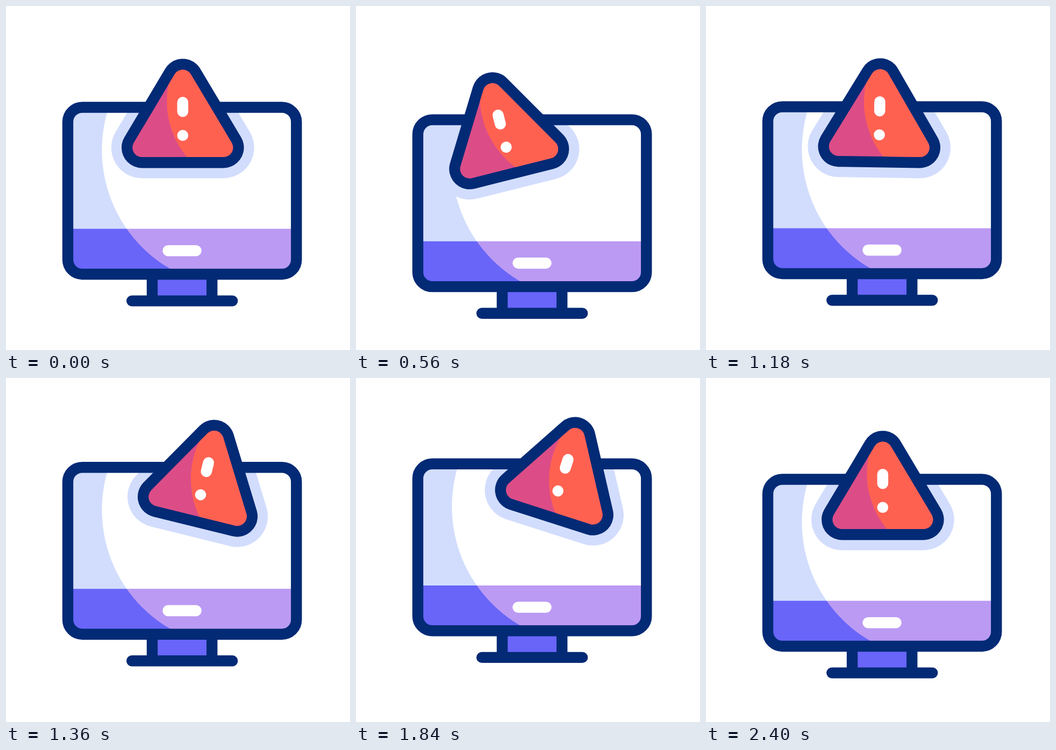
An HTML page for the animation above (2.42 s loop, 640 by 640 pixels).

```html
<!DOCTYPE html>
<html lang="en">
<head>
<meta charset="utf-8">
<title>Monitor warning</title>
<style>
  html, body { margin: 0; width: 100%; height: 100%; overflow: hidden; background: #fff; }
  svg { display: block; width: 100vw; height: 100vh; }
  .line { fill: none; stroke: #032a75; stroke-width: 20.4; stroke-linecap: round; }
  .mark { stroke: #fff; stroke-width: 20.6; stroke-linecap: round; }
  .tri { stroke-linejoin: round; }
  .halo { fill: #d2ddfd; stroke: #d2ddfd; stroke-width: 114; }
  .edge { fill: #032a75; stroke: #032a75; stroke-width: 76; }
  .dark { fill: #dc4d87; stroke: #dc4d87; stroke-width: 35.4; }
  .lit { fill: #ff6151; stroke: #ff6151; stroke-width: 35.4; }
</style>
</head>
<body>
<svg viewBox="0 0 640 640">
  <defs>
    <path id="tri" d="M328.8 136.2 404.6 263.4H253Z"/>
    <clipPath id="screen"><rect x="115" y="188.5" width="425.3" height="310.5" rx="27"/></clipPath>
    <clipPath id="glow"><circle cx="434.4" cy="268" r="256"/></clipPath>
    <clipPath id="shine"><circle cx="463.3" cy="177" r="164"/></clipPath>
  </defs>
  <g id="monitor">
    <path d="M272 499H383.2V548H272Z" fill="#6865f8"/>
    <path class="line" d="M272 499V548M383.2 499V548M234.2 548.6H421.2"/>
    <g clip-path="url(#screen)">
      <path d="M110 180H545V415H110Z" fill="#d2ddfd"/>
      <path d="M110 414.6H545V505H110Z" fill="#6865f8"/>
      <g clip-path="url(#glow)">
        <path d="M110 180H545V415H110Z" fill="#fff"/>
        <path d="M110 414.6H545V505H110Z" fill="#bb9af3"/>
      </g>
      <g class="swing"><use href="#tri" class="tri halo"/></g>
    </g>
    <path class="mark" d="M301.6 455.2H353.5"/>
    <rect class="line" x="115" y="188.5" width="425.3" height="310.5" rx="27"/>
    <g class="swing">
      <use href="#tri" class="tri edge"/>
      <use href="#tri" class="tri dark"/>
      <g clip-path="url(#shine)"><use href="#tri" class="tri lit"/></g>
      <path class="mark" d="M328.8 179.3V196.2M328.8 240.8h.01"/>
    </g>
  </g>
</svg>
<script>
  const LOOP = 2420, STEP = 20, SEGMENT = 800;
  // Poses: sign x, monitor y, sign angle
  const poses = [[0, 0, 0], [-75.8, 29.5, -18], [75.8, -36.6, 22.7], [0, 0, 0]];
  const monitor = document.getElementById('monitor');
  const swings = document.querySelectorAll('.swing');

  function draw(now) {
    const time = Math.floor(now % LOOP / STEP) * STEP;
    const i = Math.min(2, Math.floor(time / SEGMENT));
    const u = time / SEGMENT - i;
    const ease = u * u * (3 - 2 * u);
    const [x, y, angle] = poses[i].map((a, k) => a + (poses[i + 1][k] - a) * ease);
    monitor.setAttribute('transform', `translate(0 ${y})`);
    for (const g of swings) g.setAttribute('transform', `translate(${x} 0) rotate(${angle} 328.8 199.8)`);
    requestAnimationFrame(draw);
  }
  draw(0);
</script>
</body>
</html>
```
